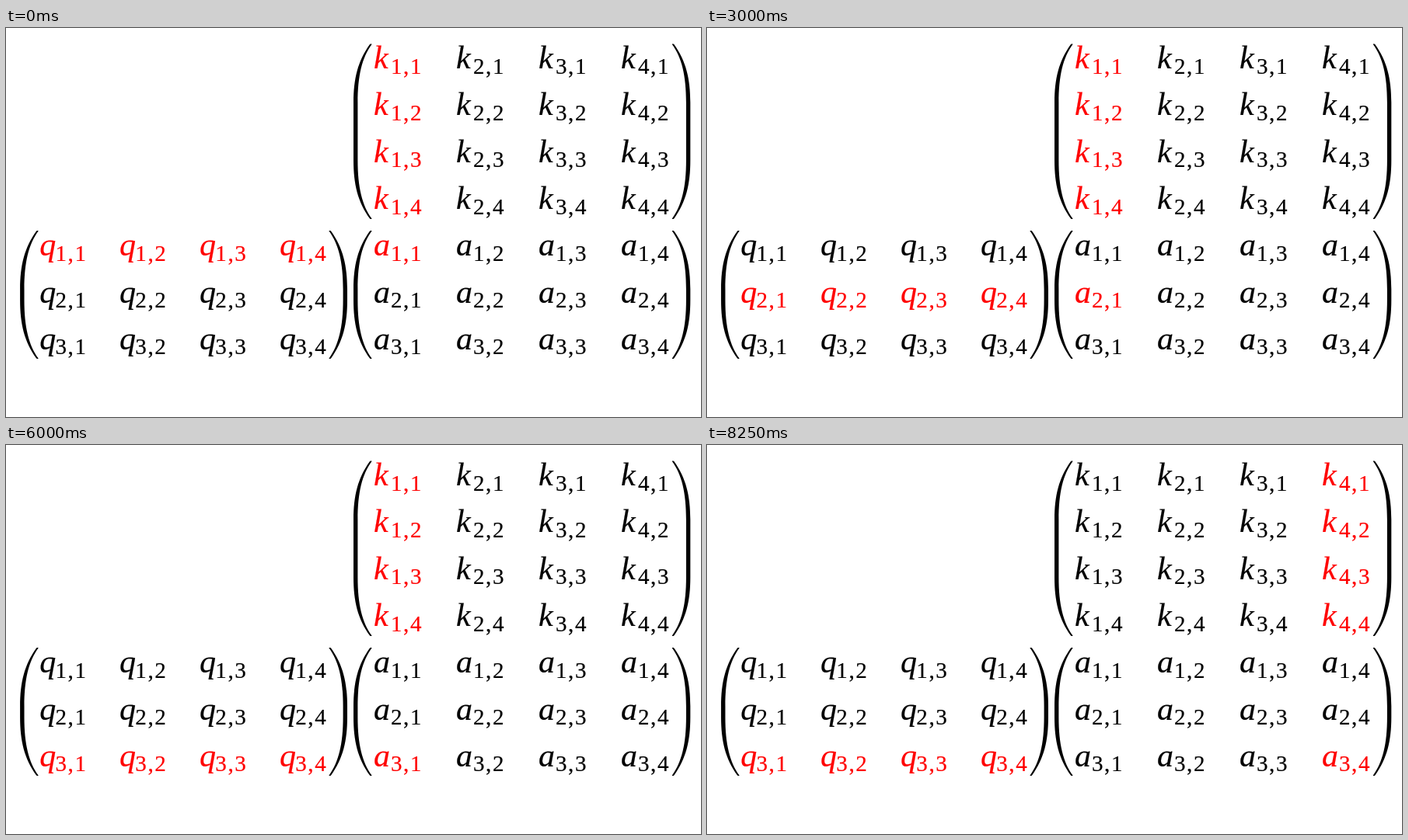
These frames come from a looping animation (894x501 px, 9 s). An HTML page:

```html
<!DOCTYPE html>
<html lang="en">
<head>
<meta charset="utf-8">
<title>Matrix product</title>
<style>
  html, body { margin: 0; width: 100%; height: 100%; overflow: hidden; background: #fff; }
  svg { display: block; width: 100%; height: 100%; }
  text { font-family: "Liberation Serif", "Times New Roman", serif; }
  .cell { fill: #000; stroke: #000; stroke-width: .2; }
  .cell.on { fill: #f00; stroke: #f00; }
  .letter { font-size: 42px; font-style: italic; }
  .sub { font-size: 29px; text-anchor: middle; }
</style>
</head>
<body>
<svg id="stage" viewBox="0 0 894 501"></svg>
<script>
const STEP = 750, COLS = 4, ROWS = 3;
const ROW_GAP = 60.3, FIRST_BASELINE = 52;
const stage = document.getElementById('stage');
const cells = [];

function add(parent, tag, attrs, text = '') {
  const el = document.createElementNS('http://www.w3.org/2000/svg', tag);
  for (const name in attrs) el.setAttribute(name, attrs[name]);
  el.textContent = text;
  parent.append(el);
  return el;
}

// Tall parenthesis: two curved ends joined by a straight bar; dir -1 mirrors it.
function paren(x, top, height, dir) {
  const bar = height - 151;
  const d = `M0 75.5C0 45 5.5 22 21 .5L21.8 0H23.3L23.5 .6C11 17.5 5.4 41 5.4 75.5
    v${bar}C5.4 ${height - 41} 11 ${height - 17.5} 23.5 ${height - .6}L23.3 ${height}H21.8
    L21 ${height - .5}C5.5 ${height - 22} 0 ${height - 45} 0 ${height - 75.5}Z`;
  add(stage, 'path', { d, transform: `translate(${x} ${top}) scale(${dir} 1)` });
}

function matrix(letter, rows, firstRow, x0, gap, subX, label, isOn) {
  for (let r = 0; r < rows; r++) {
    for (let c = 0; c < COLS; c++) {
      const x = x0 + c * gap, y = FIRST_BASELINE + (firstRow + r) * ROW_GAP;
      const el = add(stage, 'g', { class: 'cell' });
      add(el, 'text', { class: 'letter', x, y }, letter);
      const [a, b] = label(r + 1, c + 1);
      [[a, 8.2], [',', 20.7], [b, 33.2]].forEach(([s, dx]) =>
        add(el, 'text', { class: 'sub', x: x + subX + dx, y: y + 6.6 }, s));
      cells.push({ el, on: (row, col) => isOn(r, c, row, col) });
    }
  }
}

paren(447, 20.5, 225.5, 1);
paren(880.3, 20.5, 225.5, -1);
paren(18.1, 261, 165, 1);
paren(439, 261, 165, -1);
paren(447, 261, 165, 1);
paren(880.3, 261, 165, -1);

matrix('k', 4, 0, 473, 106, 21, (r, c) => [c, r], (r, c, row, col) => c === col);
matrix('q', ROWS, 4, 43.2, 102.9, 19.3, (r, c) => [r, c], (r, c, row) => r === row);
matrix('a', ROWS, 4, 473, 106, 21, (r, c) => [r, c], (r, c, row, col) => r === row && c === col);

function draw(now) {
  const i = Math.floor(now / STEP) % (ROWS * COLS);
  const row = Math.floor(i / COLS), col = i % COLS;
  for (const { el, on } of cells) el.classList.toggle('on', on(row, col));
}

const start = performance.now();
function tick() {
  draw(performance.now() - start);
  requestAnimationFrame(tick);
}
tick();
</script>
</body>
</html>
```
